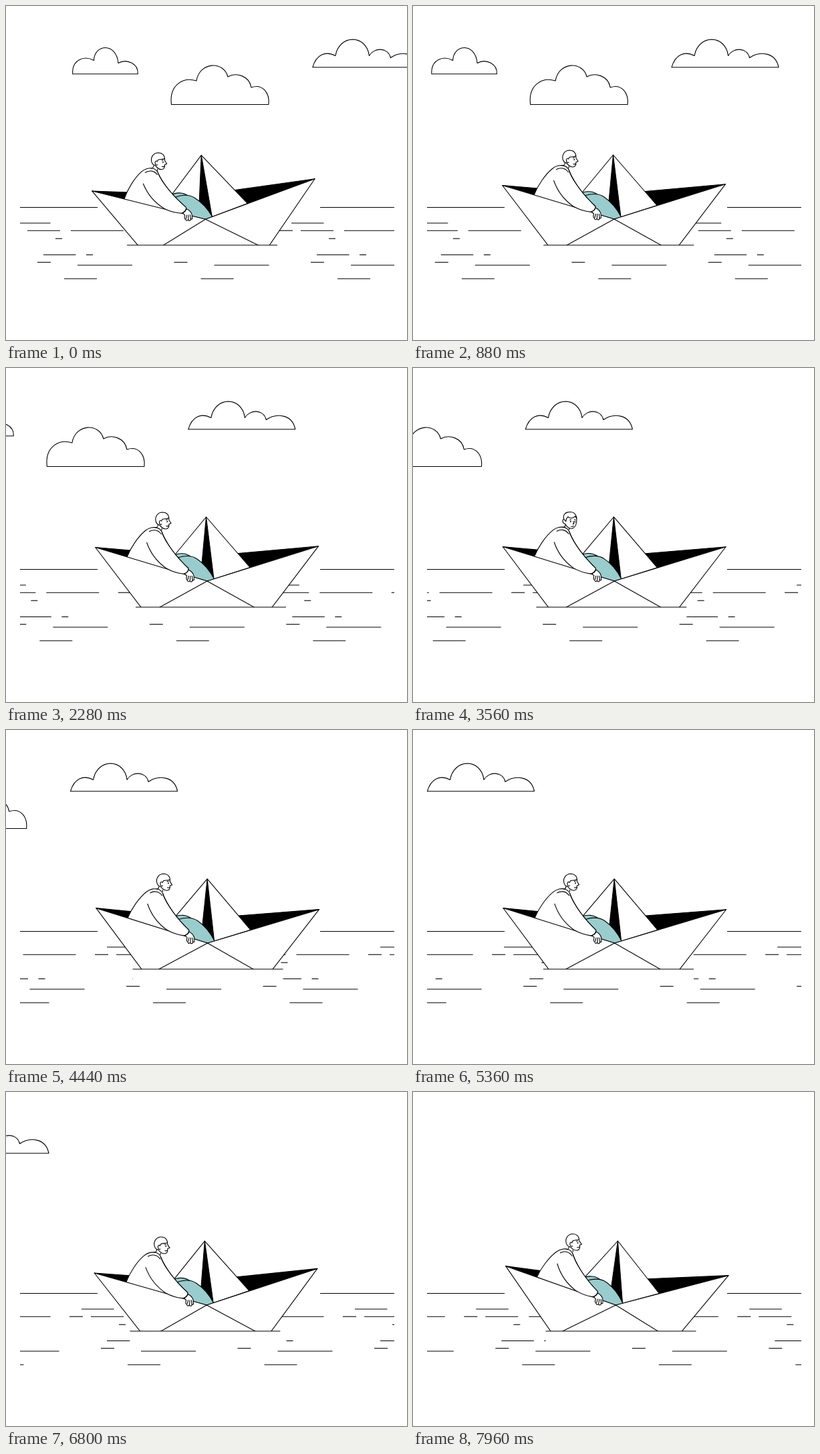
Write an HTML page with a canvas that moves like this. It is 600 px wide and 500 px high and loops after 8 s.

```html
<!DOCTYPE html>
<html lang="en">
<head>
<meta charset="utf-8">
<title>Paper boat</title>
<style>
html, body { margin: 0; width: 100%; height: 100%; overflow: hidden; background: #fff; }
canvas { display: block; width: 600px; height: 500px; }
</style>
</head>
<body>
<canvas id="stage"></canvas>
<script>
const LOOP = 8000, CLOUD_SPEED = 0.0816, WATER_SPEED = 0.0161, PERIOD = 204.5;
const WATERLINE = 358, TEAL = '#99cccc';
const PIVOT = [303, 370];
const canvas = document.getElementById('stage');
const ctx = canvas.getContext('2d');
const scale = window.devicePixelRatio || 1;
canvas.width = 600 * scale;
canvas.height = 500 * scale;

const TIMES = [0, 880, 2280, 3560, 5360, 6800, 7960];
const ROCK = [-2.85, 0, 0, 0.34, 0.67, -0.85, 2.7];
const BASE_X = [181, 195.3, 194, 184.3, 195, 185.3, 198.5];
const NOD = [3, 0, 0, 0, 0, 0, -8];

const CLOUDS = [
  'M99.8 101.700C98.500 80 117.500 73.500 131.500 81.500C132.500 56.500 165.500 54.500 168 85.500C181.500 78 198.500 87 197.300 101.700Z',
  'M247.500 147.500C244 117 266 106 285 112C290 83 326 82 332 106C344 99 364 104 367 122C384 116 395 130 393 147.500Z',
  'M458.900 91.700C464.500 72 478.500 67 493 74.500C498.500 42 539.500 42 543.500 74.500C550.500 62 571.500 61 575.500 77.500C590.500 67 614.500 69 618.900 91.700Z'
].map(d => new Path2D(d));

// Each row: y, then start and length of its dashes
const WATER = [
  [325, [18, 48.5]],
  [336.2, [0, 20], [32, 49], [97, 79]],
  [348.2, [74, 10]],
  [372.5, [56, 48.5], [120, 10]],
  [383.7, [47, 20]],
  [388, [107, 82]],
  [408.2, [87, 49]]
];

// Smooth curve through the key values
function curve(values, t) {
  const last = TIMES.length - 1;
  const slope = i => {
    const a = Math.max(0, i - 1), b = Math.min(last, i + 1);
    return (values[b] - values[a]) / (TIMES[b] - TIMES[a]);
  };
  let i = 0;
  while (i < last - 1 && t > TIMES[i + 1]) i++;
  const d = TIMES[i + 1] - TIMES[i];
  const u = (t - TIMES[i]) / d, u2 = u * u, u3 = u2 * u;
  return (2 * u3 - 3 * u2 + 1) * values[i] + (u3 - 2 * u2 + u) * d * slope(i) +
    (3 * u2 - 2 * u3) * values[i + 1] + (u3 - u2) * d * slope(i + 1);
}

function shape(d, fill, stroke = '#000') {
  const path = typeof d === 'string' ? new Path2D(d) : d;
  if (fill) { ctx.fillStyle = fill; ctx.fill(path); }
  if (stroke) { ctx.strokeStyle = stroke; ctx.stroke(path); }
}

function line(x1, y, x2) {
  ctx.beginPath();
  ctx.moveTo(x1, y);
  ctx.lineTo(x2, y);
  ctx.stroke();
}

function dot(x, y) {
  ctx.fillStyle = '#000';
  ctx.beginPath();
  ctx.arc(x, y, 1, 0, 7);
  ctx.fill();
}

function turn(degrees, x, y) {
  ctx.translate(x, y);
  ctx.rotate(degrees * Math.PI / 180);
  ctx.translate(-x, -y);
}

function drawClouds(t) {
  ctx.save();
  ctx.translate(-CLOUD_SPEED * t, 0);
  CLOUDS.forEach(c => shape(c, '#fff'));
  ctx.restore();
}

function drawWater(t) {
  ctx.strokeStyle = '#000';
  line(21, 301.5, 137);
  line(470, 301.5, 581);
  ctx.save();
  ctx.beginPath();
  ctx.rect(21, 310, 560, 110);
  ctx.clip();
  for (const [y, ...dashes] of WATER)
    for (const [start, length] of dashes)
      for (let x = start - WATER_SPEED * t - PERIOD; x < 581; x += PERIOD)
        line(x, y, x + length);
  ctx.restore();
}

function drawHead(t) {
  ctx.save();
  turn(curve(NOD, t), 231, 240);
  const facing = t > 2960 && t < 4280;
  shape('M227.500 234C227.500 237 226 238.500 224 239.500L233 246C234 244 233.500 242 233 240Z', '#fff', null);
  shape('M227.500 234.500C227.500 236.500 226.500 238 225 239M233 240L233 243');
  if (facing) {
    shape('M225 227C222 227 222.500 233 227 234C229 239 234 241 238 240.500C243 238.500 244.500 233 244 225C243 218 238 215.500 233 216C226 216.500 223 221 225 227Z', '#fff');
    shape('M225 227L228 230C228 227 229 225 231 223C234 226 239 226 242 222L244 226');
    shape('M239 229.500L240 233.500L238 234M235.500 237.500Q238 238.500 240 236.500M233.500 228L236 227.500M240.500 227.500L242.500 228');
    dot(235, 230.5);
    dot(241.5, 230.5);
  } else {
    shape('M224.200 229.500C222.500 222.500 227 216.200 234 216C241 216 244.300 220.500 243.800 227.500L247 232.500L243.800 233.700C244.300 237.500 243 241 239 241C236 241 234.500 240 233 238.500L229.500 235C226.500 234.500 225 232.500 224.200 229.500Z', '#fff');
    shape('M243.800 224.500C241 226.500 237 225 234 226.500L232.500 229');
    shape('M233 229.500C230.500 226.500 228.800 229.500 229.700 232.500C230.500 235 232.500 235 233 233.500');
    shape('M239 227.500L242 227M239.500 236.500Q241.500 237.500 243.500 236');
    dot(241.3, 229.9);
  }
  ctx.restore();
}

function drawBoat(t) {
  ctx.save();
  ctx.beginPath();
  ctx.rect(0, 0, 600, WATERLINE);
  ctx.clip();
  turn(curve(ROCK, t), ...PIVOT);

  // Inside of the boat and the sail
  shape('M133.700 268.500L190 273.300L183 283.300Z', '#000');
  shape('M347 277.500L467.400 266.800L365 298.500Z', '#000');
  shape('M299.500 223L249 284L301 319L365 298.500Z', '#fff');
  shape('M299.500 223L291.500 309L311 316Z', '#000');

  // Legs
  shape('M251 281C257 276.500 270 276 278 284L270 298Z', TEAL);
  shape('M257 284C268 280.500 279 281 286 286C297 293.500 306 305 311.500 316L301 319L270 310Z', TEAL);

  // Torso
  shape('M181 283C187 268 198 252 208.500 243.500C214 239 221 237.500 226 239.500C230 241 232.500 243 233.500 246C238 259 252 281 273 300L262 312Z', '#fff');

  // Hull
  shape('M133.700 268.500L301 319L467.400 266.800L377.300 385.500L221.700 384Z', '#fff');
  shape('M203 373L301 319L398 373');

  // Arm and hand
  shape('M210.500 261C216 277 227 291 240 300C248 304.500 258 307.500 266 308.300C270 307 273 304 273 300C262 290 250 276 240 261Z', '#fff', null);
  shape('M267 308C270 307 272.500 304.500 273 302C277 304 280 307 281 311L281.500 317C280.500 318.500 279.500 318 279 316.500L278.500 319.500C277 320.500 275.500 320 275 318.500C273.500 320.500 271.500 320 271.500 317.500C269.500 317.500 269.500 314 270.500 311Z', '#fff');
  shape('M273.500 311L272 317M276 311L275.200 318.500M278.300 311L279 316.500');
  shape('M210.500 261C216 277 227 291 240 300C248 304.500 258 307.500 266 308.300C270 307 273 304 273 300C254 282 241 264 233.500 247');

  drawHead(t);
  shape('M214 245C221 241 228 242.500 232.500 249');
  shape('M223 238.600C228 239 232 242 233.700 246.500');
  ctx.restore();
}

function draw(t) {
  ctx.setTransform(scale, 0, 0, scale, 0, 0);
  ctx.fillStyle = '#fff';
  ctx.fillRect(0, 0, 600, 500);
  ctx.lineWidth = 1.1;
  ctx.lineJoin = 'round';
  drawClouds(t);
  drawWater(t);
  const x = curve(BASE_X, t);
  ctx.fillStyle = '#fff';
  ctx.fillRect(x, WATERLINE, 225, 18);
  drawBoat(t);
  ctx.strokeStyle = '#000';
  line(x, WATERLINE, x + 225);
}

const begin = performance.now();
function tick() {
  draw((performance.now() - begin) % LOOP);
  requestAnimationFrame(tick);
}
tick();
</script>
</body>
</html>
```
